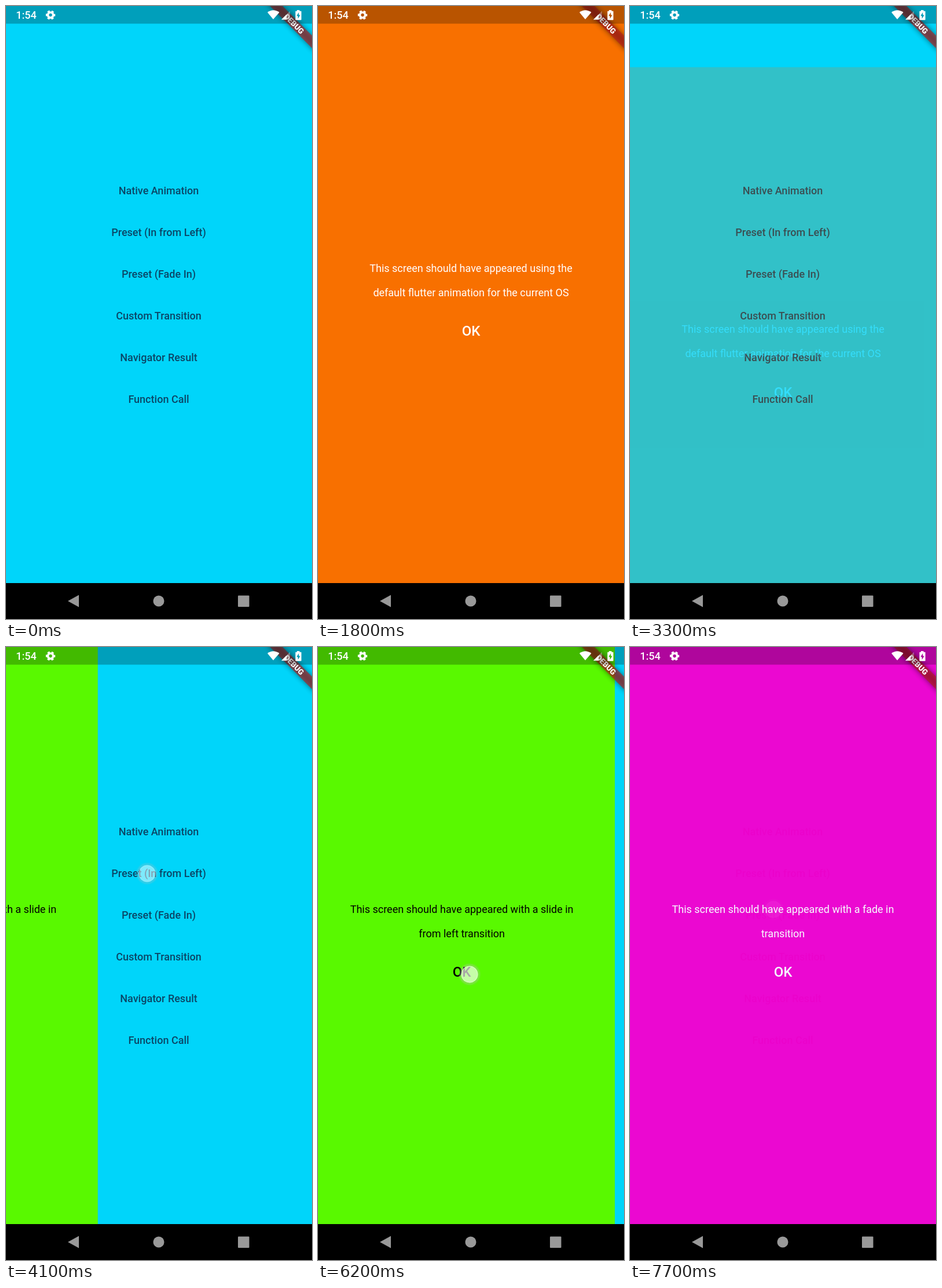
These frames come from a looping animation (529 px wide and 1058 px high, 8000 ms). An HTML page:

```html
<!DOCTYPE html>
<html lang="en">
<head>
<meta charset="utf-8">
<title>Page transitions</title>
<style>
  html, body { margin: 0; width: 100%; height: 100%; overflow: hidden; background: #000; }
  svg { display: block; width: 529px; height: 1058px; font: 18px Roboto, sans-serif; }
  .menu, .clock { font-weight: 500; }
  .menu, .page { text-anchor: middle; }
  .ok { font-size: 24px; font-weight: 500; }
</style>
</head>
<body>
<svg viewBox="0 0 529 1058">
  <defs>
    <filter id="soft" x="-30%" y="-150%" width="160%" height="400%"><feGaussianBlur stdDeviation="5"/></filter>
    <filter id="glow" x="-50%" y="-50%" width="200%" height="200%"><feGaussianBlur stdDeviation="1.6"/></filter>
  </defs>

  <rect width="529" height="996" fill="#00d5fa"/>
  <rect id="press" x="175" y="292" width="180" height="54" rx="2" fill="#fff"/>
  <g id="menu" class="menu" fill="#0b4667"></g>
  <g id="pages"></g>

  <g transform="translate(529 0) rotate(45)">
    <rect x="-60" y="36" width="120" height="15.4" opacity=".5" filter="url(#soft)"/>
    <rect x="-60" y="36" width="120" height="15.4" fill="#b71c1c" fill-opacity=".627"/>
    <text y="48.3" fill="#fff" font-size="13.1" font-weight="900" text-anchor="middle">DEBUG</text>
  </g>

  <rect width="529" height="30.5" opacity=".255"/>
  <g fill="#fff">
    <text class="clock" x="17.3" y="22.4">1:54</text>
    <g fill="none" stroke="#fff" transform="translate(77 15.6)">
      <circle r="4.6" stroke-width="3.6"/>
      <circle r="6.9" stroke-width="2.6" stroke-dasharray="4 3.226" stroke-dashoffset="2"/>
    </g>
    <path d="M462 23L452 11Q462 3.5 472.5 11Z"/>
    <path d="M476 23.5L491 8.5V23.5Z" opacity=".3"/>
    <path d="M476 23.5L485 14.5V23.5Z"/>
    <path fill-rule="evenodd" d="M503 7h4.5v1.8H510q.6 0 .6.6V23.4q0 .8-.8.8H501.200q-.8 0-.8-.8V9.400q0-.6.6-.6H503ZM506.200 10.800L502.300 17.300H504.700V22L508.700 15.400H506.200Z"/>
  </g>

  <rect y="996" width="529" height="62"/>
  <g fill="#999">
    <path d="M107 1027L126 1016.500V1037.500Z"/>
    <circle cx="264" cy="1027" r="9.500"/>
    <rect x="401" y="1017.500" width="19.500" height="19.500" rx="1"/>
  </g>

  <g id="touch">
    <circle r="16" fill="none" stroke="#bbb" stroke-width="2.500" opacity=".6" filter="url(#glow)"/>
    <circle r="14.500" fill="#fff" fill-opacity=".66"/>
    <circle r="14" fill="none" stroke="#fff" stroke-opacity=".3"/>
  </g>
</svg>
<script>
const LOOP = 8000, STEP = 100, WIDTH = 529, HEIGHT = 996;
const get = id => document.getElementById(id);
const clamp = v => Math.min(1, Math.max(0, v));

get("menu").innerHTML = ["Native Animation", "Preset (In from Left)", "Preset (Fade In)",
  "Custom Transition", "Navigator Result", "Function Call"]
  .map((label, i) => `<text x="264" y="${325 + 72 * i}">${label}</text>`).join("");

function addPage(fill, ink, first, second) {
  const page = document.createElementNS("http://www.w3.org/2000/svg", "g");
  page.setAttribute("class", "page");
  page.innerHTML = `<rect width="${WIDTH}" height="${HEIGHT}" fill="${fill}"/>
    <g fill="${ink}"><text x="264.5" y="458.500">${first}</text>
    <text x="264.5" y="500.500">${second}</text><text class="ok" x="264.5" y="569">OK</text></g>`;
  get("pages").append(page);
  return page;
}
const native = addPage("#f87000", "#fff", "This screen should have appeared using the",
  "default flutter animation for the current OS");
const slide = addPage("#59f900", "#000", "This screen should have appeared with a slide in",
  "from left transition");
const fade = addPage("#f500d0", "#fff", "This screen should have appeared with a fade in",
  "transition");

// Cubic easing from (0,0) to (1,1), solved by bisection
function bezier(x1, y1, x2, y2) {
  const at = (a, b, s) => 3 * a * s * (1 - s) ** 2 + 3 * b * s * s * (1 - s) + s ** 3;
  return x => {
    if (x <= 0 || x >= 1) return clamp(x);
    let lo = 0, hi = 1;
    for (let i = 0; i < 24; i++) {
      const mid = (lo + hi) / 2;
      if (at(x1, x2, mid) < x) lo = mid; else hi = mid;
    }
    return at(y1, y2, lo);
  };
}
const fastOutSlowIn = bezier(.4, 0, .2, 1);
const easeIn = bezier(.42, 0, 1, 1);

function track(t, keys) {
  const i = keys.findIndex(k => k[0] > t);
  if (i < 0) return keys[keys.length - 1][1];
  if (i === 0) return keys[0][1];
  const [t0, v0] = keys[i - 1], [t1, v1] = keys[i];
  return v0 + (v1 - v0) * (t - t0) / (t1 - t0);
}

const slideKeys = [[4000, 0], [4100, .3], [4200, .654], [4300, .654], [4400, .87], [4500, .973],
  [6000, .973], [6100, 1], [6200, .97], [6300, .68], [6400, .3], [6500, 0]];

// start, hold, fade-out time, x, y
const taps = [[1000, 300, 300, 246, 321], [2700, 300, 300, 262, 565], [4000, 50, 200, 244, 391],
  [6100, 100, 300, 262, 565], [7200, 100, 450, 248, 453]];

function place(page, x, y, opacity) {
  page.setAttribute("transform", `translate(${x} ${y})`);
  page.setAttribute("opacity", opacity);
}

function draw(t) {
  const n = t < 2500 ? clamp((t - 1342) / 450) : clamp((3472 - t) / 450);
  place(native, 0, HEIGHT / 4 * (1 - fastOutSlowIn(n)), easeIn(n));

  const s = track(t, slideKeys);
  place(slide, (s - 1) * WIDTH, 0, s > 0 ? 1 : 0);
  place(fade, 0, 0, clamp(Math.min(t, 7700) - 7220) && clamp((Math.min(t, 7700) - 7220) / 500));

  get("press").setAttribute("opacity", t >= 1100 && t < 1800 ? .09 : 0);

  const tap = taps.filter(p => p[0] <= t).pop();
  if (tap) {
    const [start, hold, out, x, y] = tap;
    place(get("touch"), x, y, clamp(1 - (t - start - hold) / out));
  } else place(get("touch"), 0, 0, 0);
}

function tick(now) {
  draw(Math.floor(now % LOOP / STEP) * STEP);
  requestAnimationFrame(tick);
}
tick(performance.now());
</script>
</body>
</html>
```
